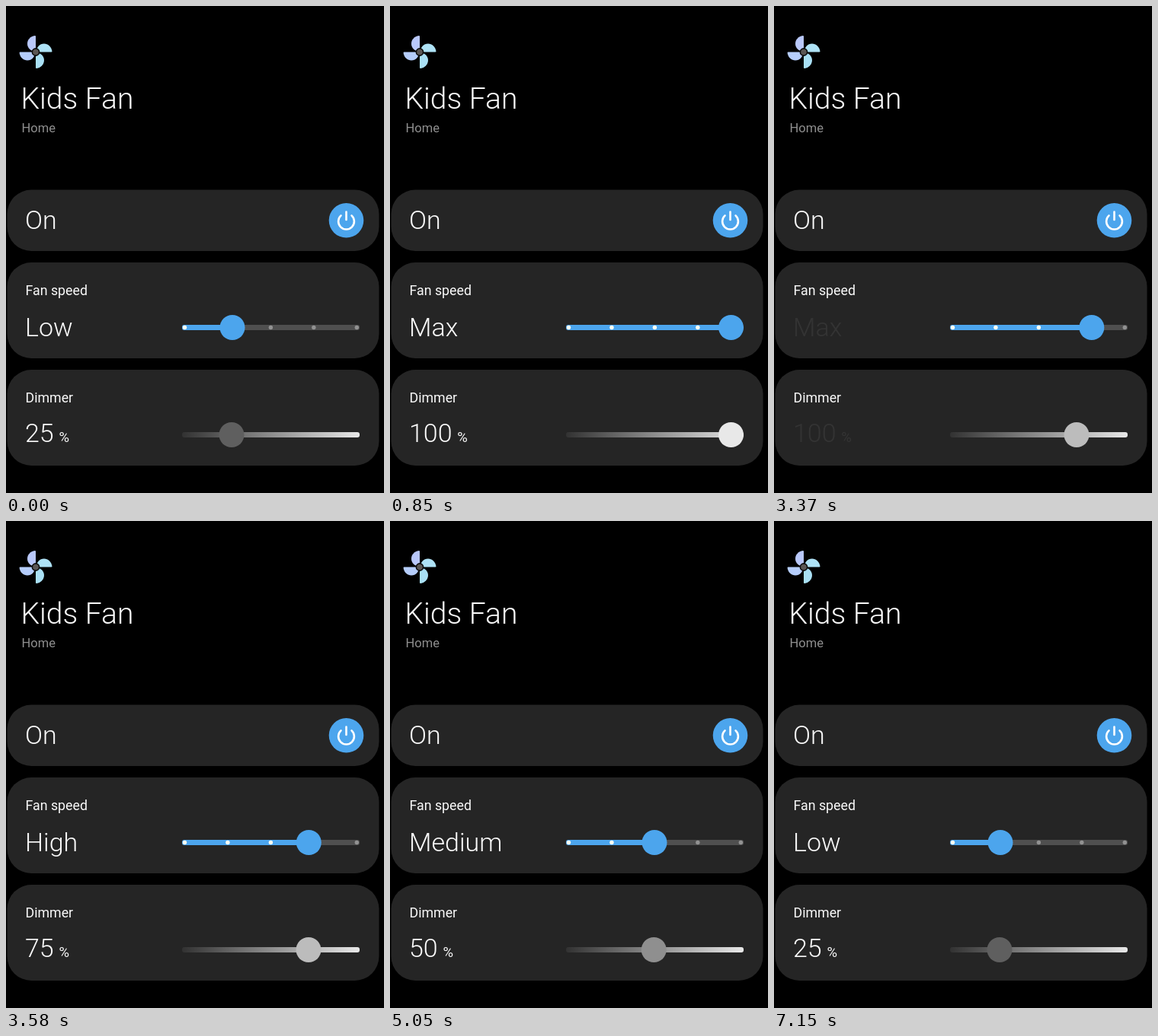
Recreate the animation shown at these times as an HTML page. Size 496x640 px, loop 8 s.

```html
<!DOCTYPE html>
<html lang="en">
<head>
<meta charset="utf-8">
<title>Fan control</title>
<style>
  html, body { margin: 0; width: 100%; height: 100%; overflow: hidden; background: #000; }
  svg { display: block; width: 100%; height: 100%; }
  text { font-family: Roboto, sans-serif; fill: #fafafa; }
  .big { font-size: 34px; font-weight: 300; }
  .label { font-size: 17.8px; }
</style>
</head>
<body>
<svg viewBox="0 0 496 640">
  <defs>
    <linearGradient id="ramp" gradientUnits="userSpaceOnUse" x1="231" x2="464" y1="0" y2="0">
      <stop offset="0" stop-color="#323232"/>
      <stop offset="1" stop-color="#e8e8e8"/>
    </linearGradient>
    <path id="blade" d="M0 0V-20.5Q0 -21.5 -1.2 -21.4C-7 -20.6 -11 -16 -11 -11C-11 -5 -6.5 -1.5 0 0Z"/>
  </defs>
  <rect width="496" height="640"/>

  <g transform="translate(39 60.5)">
    <use href="#blade" fill="#b9c8fb"/>
    <use href="#blade" fill="#aee2f6" transform="rotate(90)"/>
    <use href="#blade" fill="#a9e0f5" transform="rotate(180)"/>
    <use href="#blade" fill="#b5cdfb" transform="rotate(270)"/>
    <circle r="4.6" fill="#5a5654" stroke="#0c0c0c" stroke-width="1.6"/>
  </g>
  <text x="19.5" y="135" font-size="39" font-weight="300">Kids Fan</text>
  <text x="20.5" y="166" font-size="16.5" style="fill:#8f8f8f">Home</text>

  <g fill="#252525">
    <rect x="1.5" y="241.5" width="488" height="80.5" rx="32"/>
    <rect x="1.5" y="337" width="488" height="126" rx="32"/>
    <rect x="1.5" y="478" width="488" height="126" rx="32"/>
  </g>

  <text class="big" x="25" y="293">On</text>
  <circle cx="446.5" cy="281.8" r="22.8" fill="#4ca5ed"/>
  <path d="M439.5 275.4A10.4 10.4 0 1 0 453.5 275.4M446.5 270.6V281" fill="none" stroke="#fff" stroke-width="2.6" stroke-linecap="round"/>

  <text class="label" x="25.5" y="380">Fan speed</text>
  <text class="big" id="speed" x="25" y="434"></text>
  <rect x="231" y="419" width="233" height="7" rx="3" fill="#4f4f4f"/>
  <rect id="fill" x="231" y="419" height="7" rx="3" fill="#4ca5ed"/>
  <g id="dots"></g>
  <circle id="fanKnob" cy="422.5" r="16.5" fill="#4ca5ed"/>

  <text class="label" x="25.5" y="521">Dimmer</text>
  <text class="big" id="dim" x="25" y="573"><tspan id="level"></tspan><tspan dx="6.7" dy="-.5" font-size="18.5" font-weight="400">%</tspan></text>
  <rect x="231" y="560" width="233" height="7" rx="3" fill="url(#ramp)"/>
  <circle id="dimKnob" cy="563.5" r="16.5"/>
</svg>
<script>
const LOOP = 8000, STEP = 70, FADE = 150, SLIDE = 300;
const $ = id => document.getElementById(id);
const set = (el, attrs) => { for (const k in attrs) el.setAttribute(k, attrs[k]); };

const LEVELS = [
  { name: 'Low', pct: 25, fan: 297, dim: 296, color: '#5f5f5f' },
  { name: 'Medium', pct: 50, fan: 347, dim: 346.2, color: '#8f8f8f' },
  { name: 'High', pct: 75, fan: 397.3, dim: 397, color: '#bcbcbc' },
  { name: 'Max', pct: 100, fan: 447.5, dim: 447.5, color: '#e8e8e8' }
];
// lead: time already elapsed when the change first shows
const CHANGES = [
  { at: 500, lead: 0, from: 0, to: 3 },
  { at: 3230, lead: 0, from: 3, to: 2 },
  { at: 4770, lead: STEP, from: 2, to: 1 },
  { at: 6870, lead: STEP, from: 1, to: 0 }
];
const IDLE = { at: -LOOP, lead: 0, from: 0, to: 0 };

const dots = [0, 1, 2, 3, 4].map(i => {
  const dot = document.createElementNS('http://www.w3.org/2000/svg', 'circle');
  set(dot, { cx: 234.5 + i * 56.45, cy: 422.5, r: 2.7 });
  $('dots').append(dot);
  return dot;
});

function draw(t) {
  const c = CHANGES.filter(c => c.at <= t).pop() || IDLE;
  const age = Math.floor((t - c.at) / STEP) * STEP + c.lead;
  const a = LEVELS[c.from], b = LEVELS[c.to];

  const p = 1 - Math.pow(1 - Math.min(1, age / SLIDE), 1.5);
  const x = a.fan + (b.fan - a.fan) * p;
  set($('fanKnob'), { cx: x });
  set($('fill'), { width: x - 231 });
  dots.forEach(d => set(d, { fill: d.getAttribute('cx') < x ? '#fffdf2' : '#929292' }));
  set($('dimKnob'), { cx: b.dim, fill: b.color });

  const shown = age < FADE ? a : b;
  const alpha = age < FADE ? 1 - age / FADE : Math.min(1, (age - FADE) / FADE);
  $('speed').textContent = shown.name;
  $('level').textContent = shown.pct;
  set($('speed'), { opacity: alpha });
  set($('dim'), { opacity: alpha });
}

const start = performance.now();
function tick() {
  draw((performance.now() - start) % LOOP);
  requestAnimationFrame(tick);
}
tick();
</script>
</body>
</html>
```
